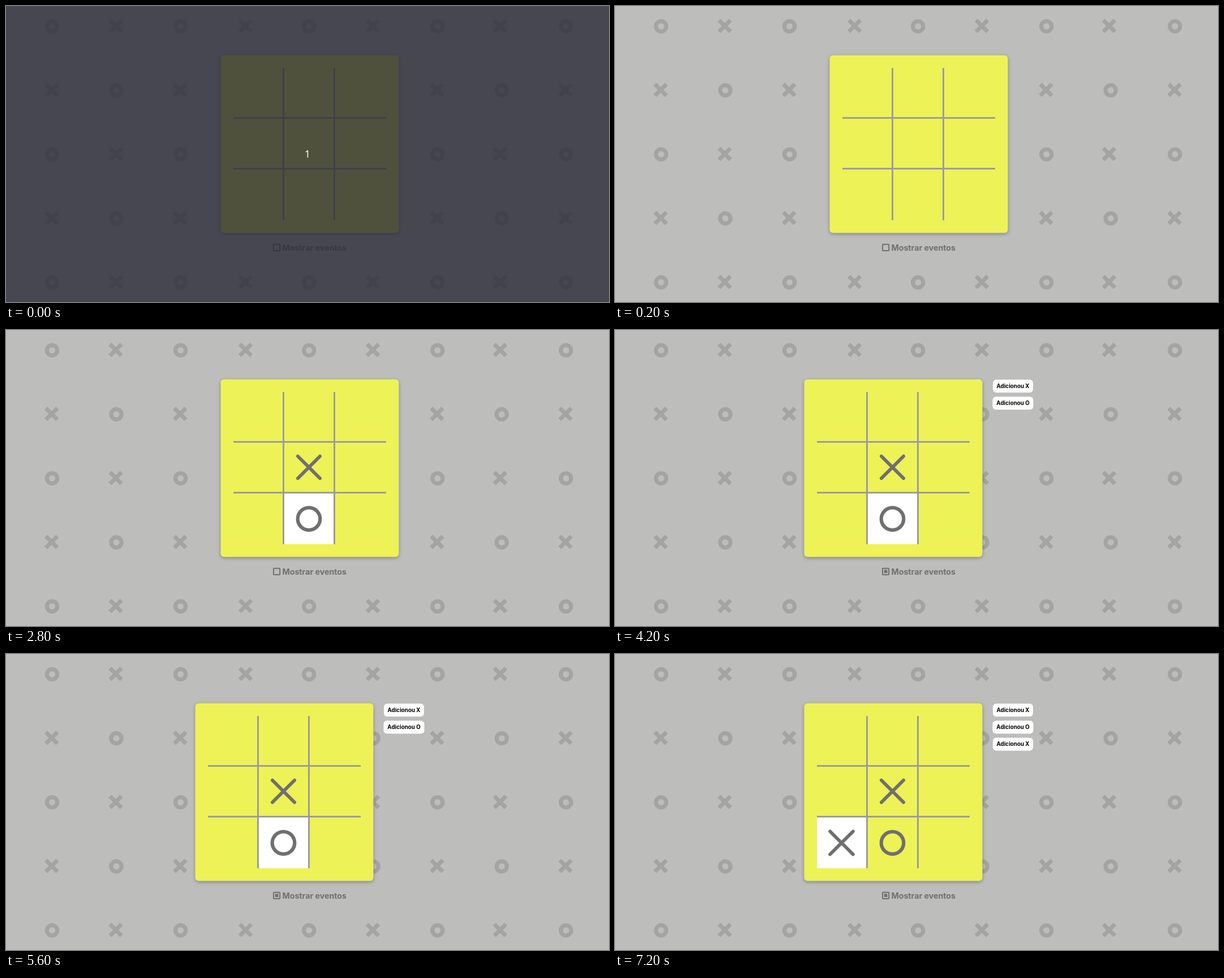
Recreate the animation shown at these times as an HTML page with a canvas. Size 1066 by 525 pixels, loop 8000 ms.

```html
<!DOCTYPE html>
<html lang="pt">
<head>
<meta charset="utf-8">
<title>Jogo da velha</title>
<style>
html, body { margin: 0; width: 100%; height: 100%; overflow: hidden; background: #bdbdbc; }
canvas { display: block; width: 1066px; height: 525px; }
</style>
</head>
<body>
<canvas id="stage" width="1066" height="525"></canvas>
<script>
const ctx = document.getElementById('stage').getContext('2d');
const LOOP = 8000;
const INK = '#706f6f', LINE = '#9c9c9b', FAINT = '#a4a4a3';

// Moves: time, mark, column, row
const moves = [
  { at: 1800, mark: 'X', col: 1, row: 1 },
  { at: 2800, mark: 'O', col: 1, row: 2 },
  { at: 7200, mark: 'X', col: 0, row: 2 }
];
const toggles = [4200, 5000, 5600];

function box(x, y, w, h, r, color) {
  ctx.fillStyle = color;
  ctx.beginPath();
  ctx.roundRect(x, y, w, h, r);
  ctx.fill();
}

function ring(x, y, r, width, color) {
  ctx.strokeStyle = color;
  ctx.lineWidth = width;
  ctx.beginPath();
  ctx.arc(x, y, r, 0, Math.PI * 2);
  ctx.stroke();
}

function cross(x, y, r, width, color, cap) {
  ctx.strokeStyle = color;
  ctx.lineWidth = width;
  ctx.lineCap = cap;
  ctx.beginPath();
  ctx.moveTo(x - r, y - r);
  ctx.lineTo(x + r, y + r);
  ctx.moveTo(x + r, y - r);
  ctx.lineTo(x - r, y + r);
  ctx.stroke();
}

function text(str, x, y, font, color, align) {
  ctx.font = font;
  ctx.fillStyle = color;
  ctx.textAlign = align;
  ctx.fillText(str, x, y);
}

function drawPattern() {
  const oddX = [194, 423.5, 648.5, 873.5];
  for (let row = 0; row < 5; row++) {
    const y = 36 + row * 113.55;
    for (let col = 0; col < 9; col++) {
      const even = col % 2 === 0;
      const x = 81.5 + col * 113.55;
      if ((row + col) % 2 === 0) ring(x, y, 9.1, 7.2, FAINT);
      else cross(even ? x - 0.8 : oddX[(col - 1) / 2], y - 0.7, 10.2, 7.2, FAINT, 'butt');
    }
  }
}

function drawBoard(left, done) {
  ctx.save();
  ctx.shadowColor = 'rgba(0,0,0,0.3)';
  ctx.shadowBlur = 6;
  ctx.shadowOffsetY = 2;
  box(left, 87.5, 315, 315, 6, '#edf257');
  ctx.restore();

  const x0 = left + 22.5, y0 = 110;
  done.forEach((m, i) => {
    const x = x0 + m.col * 90, y = y0 + m.row * 90;
    if (i === done.length - 1) {
      ctx.fillStyle = '#fff';
      ctx.fillRect(x, y, m.col < 2 ? 87 : 90, m.row < 2 ? 87 : 90);
    }
    const cx = x + 43.5, cy = y + (m.row === 2 ? 45 : 43.5);
    if (m.mark === 'O') ring(cx, cy, 19.8, 6.2, INK);
    else cross(cx, cy, m.row === 2 ? 20.4 : 19.6, 5.8, INK, 'round');
  });

  ctx.fillStyle = LINE;
  for (const d of [87, 177]) {
    ctx.fillRect(x0 + d, y0, 3, 270);
    ctx.fillRect(x0, y0 + d, 270, 3);
  }
}

function drawToggle(on) {
  ctx.strokeStyle = INK;
  ctx.lineWidth = 2;
  ctx.beginPath();
  ctx.roundRect(473, 422.7, 11.2, 11.2, 1);
  ctx.stroke();
  if (on) {
    ctx.fillStyle = INK;
    ctx.fillRect(475.8, 425.5, 5.6, 5.6);
  }
  text('Mostrar eventos', 488.5, 433.6, '700 14.2px Inter, "Open Sans", sans-serif', INK, 'left');
}

function drawEvents(done) {
  done.forEach((m, i) => {
    const w = m.mark === 'O' ? 72 : 71;
    const y = 88 + i * 30.3;
    box(703.5 - w / 2, y, w, 23, 6, '#fff');
    text('Adicionou ' + m.mark, 703.5, y + 14.8, '700 9.8px Inter, "Open Sans", sans-serif', '#000', 'center');
  });
}

function drawIntro() {
  ctx.fillStyle = 'rgba(40,42,54,0.8)';
  ctx.fillRect(0, 0, 1066, 525);
  text('1', 533, 269, '18px "Noto Sans", "Open Sans", sans-serif', '#f8f8f2', 'center');
}

function draw(t) {
  const done = moves.filter(m => t >= m.at);
  const open = toggles.filter(at => t >= at).length % 2 === 1;
  ctx.fillStyle = '#bdbdbc';
  ctx.fillRect(0, 0, 1066, 525);
  drawPattern();
  drawBoard(open ? 334.5 : 379.5, done);
  drawToggle(open);
  if (open) drawEvents(done);
  if (t < 200) drawIntro();
}

const start = performance.now();
function tick() {
  draw((performance.now() - start) % LOOP);
  requestAnimationFrame(tick);
}
tick();
</script>
</body>
</html>
```
